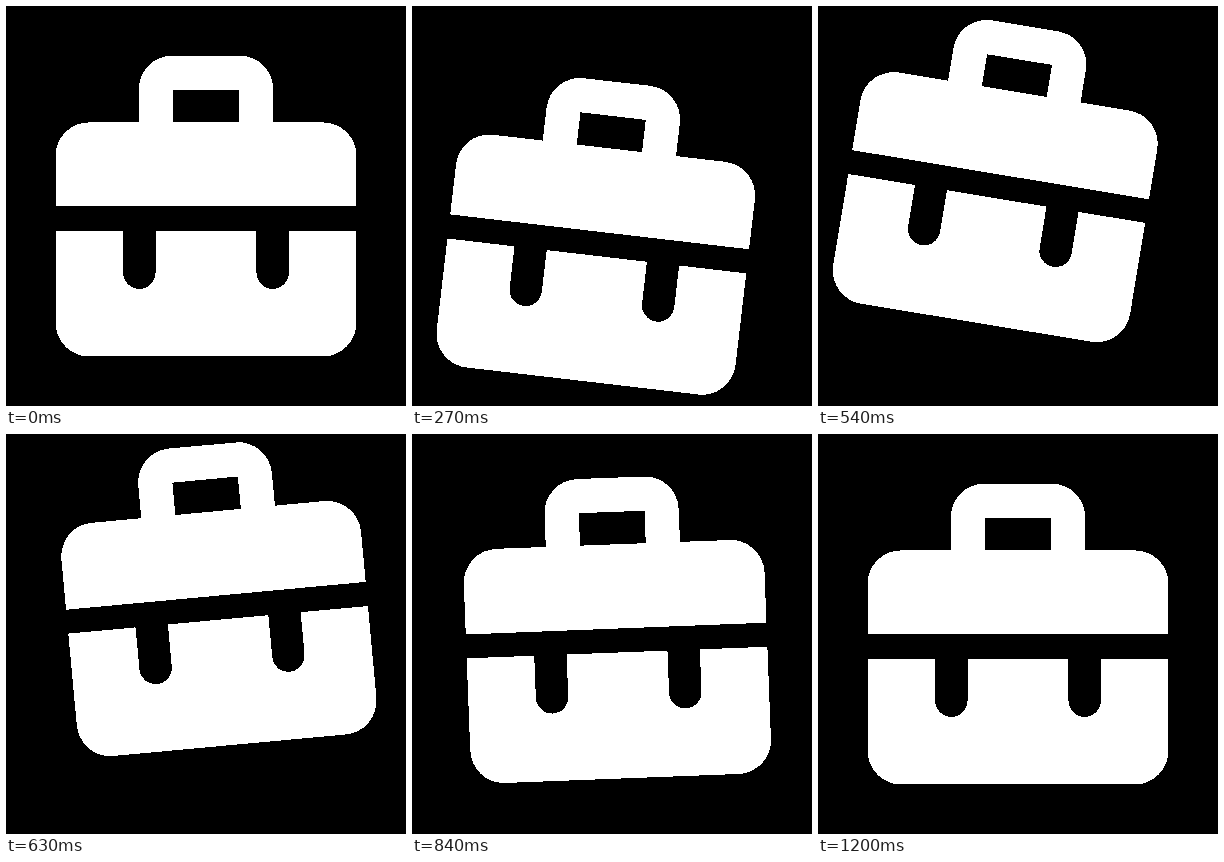
Recreate the animation shown at these times as an HTML page with a canvas. Size 400x400 px, loop 1.73 s.

```html
<!DOCTYPE html>
<html lang="en">
<head>
<meta charset="utf-8">
<title>Briefcase</title>
<style>
  html, body { margin: 0; width: 100%; height: 100%; overflow: hidden; background: #000; }
  canvas { display: block; width: 400px; height: 400px; }
</style>
</head>
<body>
<canvas id="stage" width="400" height="400"></canvas>
<script>
const SIZE = 400;
const UNIT = SIZE / 24;
const LOOP = 1730;
const STEP = 30;
const MOTION_END = 1200;
const SWING = 240;
const PIVOT_Y = 93.5;

const canvas = document.getElementById('stage');
const ctx = canvas.getContext('2d', { willReadFrequently: true });

// Rises smoothly from 0 to 1 between two times.
function ease(time, from, to) {
  const part = Math.min(1, Math.max(0, (time - from) / (to - from)));
  return (1 - Math.cos(Math.PI * part)) / 2;
}

function tiltAt(time) {
  const swing = k => ease(time, k * SWING, (k + 1) * SWING);
  return 13.3 * ease(time, 60, 2 * SWING) - 26.9 * swing(2) + 22.8 * swing(3) - 9.2 * swing(4);
}

function liftAt(time) {
  return 26.2 * ease(time, 0, 270) - 64.5 * ease(time, 270, 620) + 38.3 * ease(time, 620, 915);
}

// Lengths are in icon units; the radii round the top and bottom corners.
function shape(mode, x, y, w, h, top = 0, bottom = 0) {
  ctx.globalCompositeOperation = mode;
  ctx.beginPath();
  ctx.roundRect(x, y, w, h, [top, top, bottom, bottom]);
  ctx.fill();
}
const add = (...args) => shape('source-over', ...args);
const cut = (...args) => shape('destination-out', ...args);

function drawBriefcase() {
  ctx.fillStyle = '#fff';
  add(8, 3, 8, 5, 2);
  cut(10, 5, 4, 2.5);
  add(3, 7, 18, 5, 2);
  add(3, 13.5, 18, 7.5, 0, 2);
  cut(7, 13, 2, 4, 0, 1);
  cut(15, 13, 2, 4, 0, 1);
}

// Every touched pixel becomes solid, giving the picture hard edges.
function hardenEdges() {
  const image = ctx.getImageData(0, 0, SIZE, SIZE);
  const data = image.data;
  for (let i = 0; i < data.length; i += 4) {
    const solid = data[i + 3] > 8;
    data.fill(solid ? 255 : 0, i, i + 4);
  }
  ctx.putImageData(image, 0, 0);
}

function render(elapsed) {
  const time = Math.min(MOTION_END, Math.floor((elapsed % LOOP) / STEP) * STEP);
  ctx.resetTransform();
  ctx.clearRect(0, 0, SIZE, SIZE);
  ctx.translate(SIZE / 2, PIVOT_Y + liftAt(time));
  ctx.rotate(tiltAt(time) * Math.PI / 180);
  ctx.translate(-SIZE / 2, -PIVOT_Y);
  ctx.scale(UNIT, UNIT);
  drawBriefcase();
  hardenEdges();
}

const start = performance.now();
function tick() {
  render(performance.now() - start);
  requestAnimationFrame(tick);
}
tick();
</script>
</body>
</html>
```
